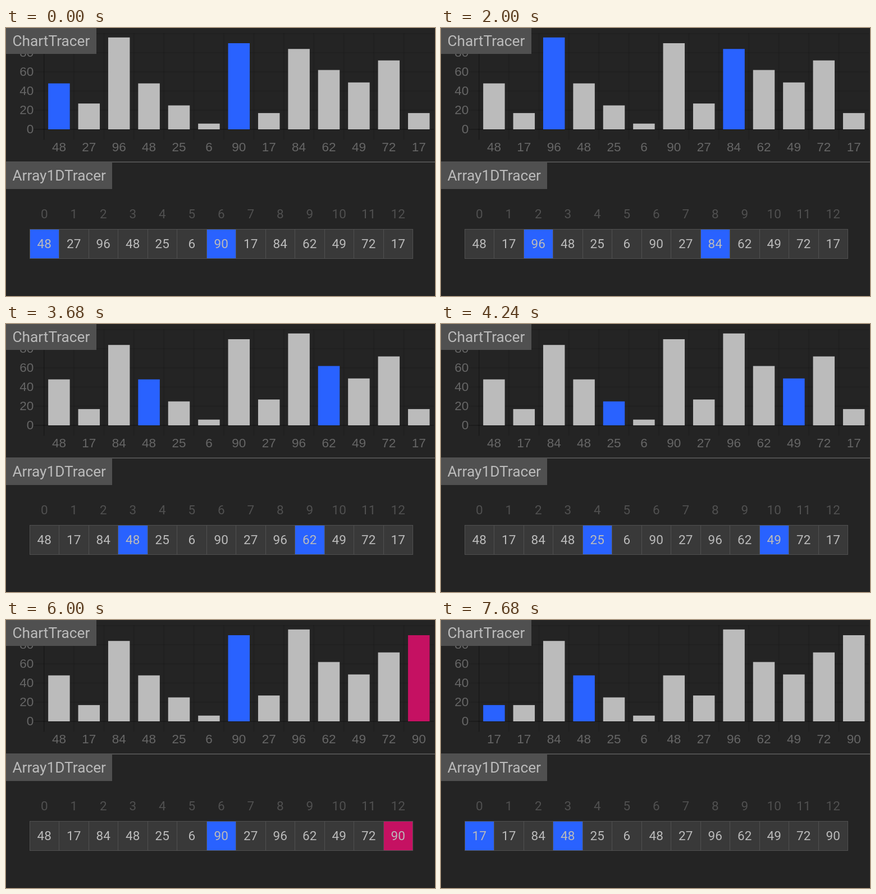
Write an HTML page with a canvas that moves like this. It is 764x476 px and loops after 8 s.

```html
<!DOCTYPE html>
<html>
<head>
<meta charset="utf-8">
<style>
  html, body { margin: 0; width: 100%; height: 100%; overflow: hidden; background: #242424; }
  canvas { display: block; }
</style>
</head>
<body>
<canvas id="stage" width="764" height="476"></canvas>
<script>
const ctx = document.getElementById('stage').getContext('2d');
const LOOP = 8000;
const TIMES = [0, 360, 880, 1440, 2000, 2560, 3120, 3680, 4240, 4800, 5320, 5880, 6440, 7000, 7560];
const START = [48, 27, 96, 48, 25, 6, 90, 17, 84, 62, 49, 72, 17];
const SELECTED = '#2962ff', PATCHED = '#c51162', LIGHT = '#505050', FONT = '#bbbbbb';
const SANS = '"Liberation Sans", Arial, sans-serif', ROBOTO = 'Roboto, sans-serif';

// Shell sort, recording one snapshot per visible step
function record(data) {
  const steps = [];
  const snap = (selected, patched) => steps.push({ values: [...data], selected, patched });
  for (let gap = data.length >> 1; gap; gap >>= 1) {
    for (let i = gap; i < data.length; i++) {
      const held = data[i], pair = [i, i - gap];
      snap(pair);
      let j = i;
      for (; j >= gap && held < data[j - gap]; j -= gap) {
        data[j] = data[j - gap];
        snap(pair, j);
      }
      if (j !== i) {
        data[j] = held;
        snap(pair, j);
      }
    }
  }
  return steps;
}
const steps = record([...START]);

function rect(x, y, w, h, color) {
  ctx.fillStyle = color;
  ctx.fillRect(x, y, w, h);
}

function text(str, x, y, color, font, size = 22.5, align = 'center') {
  ctx.font = `${size}px ${font}`;
  ctx.textAlign = align;
  ctx.fillStyle = color;
  ctx.fillText(str, x, y);
}

function title(str, y, w, h) {
  rect(0, y, w, h, LIGHT);
  text(str, 11.5, y + 32, FONT, ROBOTO, 26.25, 'left');
}

const colorOf = (step, i, plain) =>
  i === step.patched ? PATCHED : step.selected.includes(i) ? SELECTED : plain;

function drawChart(step) {
  const left = 67.7, pitch = 53.4, base = 180, unit = 1.7;
  const gridColor = n => `rgba(0,0,0,${n ? 0.1 : 0.25})`;
  for (let v = 0; v <= 100; v += 20) {
    const y = base - v * unit;
    rect(49, y - 1, 713, 1.9, gridColor(v));
    if (v < 100) text(v, 49.3, y + 7, '#666', SANS, 22.5, 'right');
  }
  step.values.forEach((v, i) => {
    const x = left + i * pitch, mid = x + pitch / 2;
    rect(x - 1, 9.5, 1.9, 189, gridColor(i));
    rect(mid - 19.25, base - v * unit, 38.5, v * unit, colorOf(step, i, FONT));
    text(v, mid, 218.5, '#666', SANS);
  });
  title('ChartTracer', 0, 161, 46);
}

function drawArray(step) {
  const left = 42, top = 357, size = 52.5;
  rect(0, 237, 764, 2, LIGHT);
  title('Array1DTracer', 239, 189, 47);
  step.values.forEach((v, i) => {
    const x = Math.round(left + i * size), mid = left + (i + 0.5) * size;
    rect(x, top, Math.round(left + (i + 1) * size) - x, 53, colorOf(step, i, '#393939'));
    text(i, mid, 338, LIGHT, ROBOTO);
    text(v, mid, 391, FONT, ROBOTO);
  });
  for (let i = 0; i <= 13; i++) rect(Math.floor(left + i * size), top, 1, 53, LIGHT);
  rect(left, top, 683, 1, LIGHT);
  rect(left, top + 52, 683, 1, LIGHT);
}

function frame() {
  const now = performance.now() % LOOP;
  const step = steps[TIMES.filter(t => t <= now).length - 1];
  rect(0, 0, 764, 476, '#242424');
  drawChart(step);
  drawArray(step);
  requestAnimationFrame(frame);
}
frame();
</script>
</body>
</html>
```
